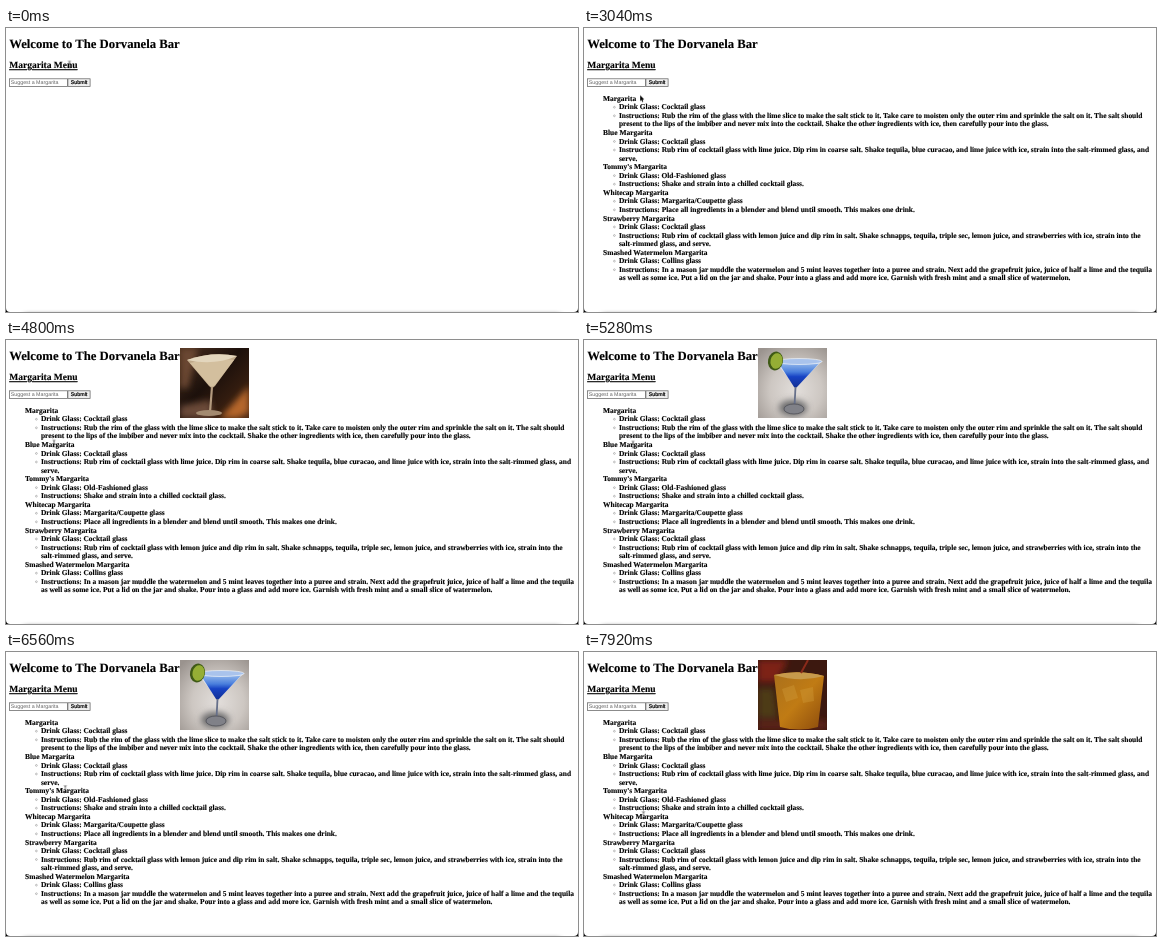
An HTML page that plays this animation: 572x284 px, repeating every 8 s.

```html
<!DOCTYPE html>
<html lang="en">
<head>
<meta charset="utf-8">
<title>Margarita Menu</title>
<style>
  html, body { margin: 0; width: 100%; height: 100%; overflow: hidden; background: #000; }
  svg { display: block; }
  text {
    font-family: "Liberation Serif", Times, serif; font-weight: bold;
    text-rendering: geometricPrecision; stroke: #000; stroke-width: .12;
  }
  .h1 { font-size: 12.71px; }
  .h2 { font-size: 9.53px; text-decoration: underline; }
  .list text { font-size: 7.455px; }
  .form text { font: 5.3px "Liberation Sans", Arial, sans-serif; stroke-width: .2; }
  .form .hint { fill: #666; stroke: none; }
  .list circle { fill: none; stroke: #555; stroke-width: .35; }
  .photo, .list, .arrow { opacity: 0; }
</style>
</head>
<body>
<svg width="572" height="284" viewBox="0 0 572 284">
  <defs>
    <clipPath id="page"><path d="M0 0H572V280Q572 284 568 284H4Q0 284 0 280Z"/></clipPath>
    <clipPath id="frame"><rect width="69" height="70"/></clipPath>
    <filter id="soft" x="-20%" y="-200%" width="140%" height="500%"><feGaussianBlur stdDeviation="3 1.5"/></filter>
    <filter id="haze" x="-50%" y="-50%" width="200%" height="200%"><feGaussianBlur stdDeviation="3"/></filter>
    <linearGradient id="bar" x2="1" y2="1">
      <stop stop-color="#4a3020"/><stop offset=".45" stop-color="#1c100b"/><stop offset="1" stop-color="#4d2a14"/>
    </linearGradient>
    <radialGradient id="wall" cx=".55" cy=".6" r=".75">
      <stop stop-color="#e2dedb"/><stop offset=".5" stop-color="#cdc7c2"/><stop offset="1" stop-color="#9a938e"/>
    </radialGradient>
    <linearGradient id="blue" x2="0" y2="1">
      <stop stop-color="#8fb4ea"/><stop offset=".35" stop-color="#4a7fdc"/><stop offset=".55" stop-color="#1743c4"/><stop offset="1" stop-color="#122f94"/>
    </linearGradient>
    <linearGradient id="amber" x2="1" y2="1">
      <stop stop-color="#a9701c"/><stop offset=".5" stop-color="#c07b14"/><stop offset="1" stop-color="#8c4b0c"/>
    </linearGradient>
  </defs>
  <g clip-path="url(#page)">
    <rect width="572" height="284" fill="#fff"/>
    <rect x="18" y="284" width="536" height="4" opacity=".25" filter="url(#soft)"/>
    <text class="h1" x="3.2" y="19.9">Welcome to The Dorvanela Bar</text>
    <text class="h2" x="3.2" y="40.2">Margarita Menu</text>
    <g class="form">
      <rect x="3.5" y="50.8" width="57.9" height="7.7" fill="#fff" stroke="#666" stroke-width=".75"/>
      <text class="hint" x="4.8" y="56.4">Suggest a Margarita</text>
      <rect x="61.9" y="50.8" width="22.2" height="7.7" fill="#efefef" stroke="#666" stroke-width=".75"/>
      <text x="64.8" y="56.4">Submit</text>
    </g>
    <g class="list"></g>

    <g transform="translate(174 8)" clip-path="url(#frame)">
      <g class="photo">
        <rect width="69" height="70" fill="url(#bar)"/>
        <g filter="url(#haze)">
          <path d="M40 70L69 38V64L58 70Z" fill="#b5662a"/>
          <path d="M0 0H18L8 40H0Z" fill="#6b4730"/>
          <path d="M0 58L30 52L34 70H0Z" fill="#6a4a38"/>
        </g>
        <path d="M7 12Q32 3 57 8L35 38Q32 41 29 38Z" fill="#bfa98a"/>
        <path d="M10 15Q32 9 54 12L35 37Q32 40 29 37Z" fill="#d3bf9e"/>
        <path d="M7 12Q32 3 57 8Q34 18 7 12Z" fill="#e3d6bd"/>
        <path d="M32 39L30 64" stroke="#b39a7e" stroke-width="2.2"/>
        <ellipse cx="29" cy="65" rx="13" ry="3" fill="#a38a70"/>
      </g>
      <g class="photo">
        <rect width="69" height="70" fill="url(#wall)"/>
        <ellipse cx="35" cy="60" rx="14" ry="8" fill="#6b6a6c" filter="url(#haze)"/>
        <path d="M17 13H64L38 40Z" fill="#dfe3ea"/>
        <path d="M21 15.5H61L39 39Q37.5 40 36 39Z" fill="url(#blue)"/>
        <ellipse cx="41" cy="13.5" rx="23" ry="3" fill="#a9c3ec" stroke="#eef2f6" stroke-width=".7"/>
        <path d="M37.5 39L36.5 58" stroke="#66708a" stroke-width="1.8"/>
        <ellipse cx="36" cy="61" rx="10" ry="5" fill="#808188" stroke="#505158" stroke-width=".8"/>
        <ellipse cx="17.5" cy="13" rx="7.5" ry="9.5" transform="rotate(12 17.5 13)" fill="#3f5a16"/>
        <ellipse cx="18.5" cy="13" rx="6" ry="7.8" transform="rotate(12 18.5 13)" fill="#95ae35"/>
      </g>
      <g class="photo">
        <rect width="69" height="70" fill="#3c180f"/>
        <g filter="url(#haze)">
          <path d="M0 0H30L18 22H0Z" fill="#7d2014"/>
          <path d="M0 28H16L20 58H0Z" fill="#4d3a18"/>
          <path d="M0 60H69V70H0Z" fill="#5a2112"/>
        </g>
        <path d="M16 15Q40 9 66 16L60 67Q41 72 22 67Z" fill="url(#amber)"/>
        <path d="M16 15Q40 9 66 16Q42 23 16 15Z" fill="#c79a4c"/>
        <path d="M24 29L36 25L40 38L28 42ZM42 30L55 27L56 41L45 43Z" fill="#d09a3a" opacity=".4"/>
        <path d="M43 13L50 0" stroke="#8a2a1a" stroke-width="2"/>
      </g>
    </g>

    <g class="cursor">
      <path class="beam" d="M-1.3 -3.3Q0 -3.3 0 -2.5Q0 -3.3 1.3 -3.3M0 -2.5V2.5M-1.3 3.3Q0 3.3 0 2.5Q0 3.3 1.3 3.3" fill="none" stroke="#111" stroke-width=".6"/>
      <path class="arrow" d="M-1.8 -3.2V2.6L-.5 1.4L.4 3.4L1.3 3L.5 1.1H2.3Z" stroke="#fff" stroke-width=".5" paint-order="stroke"/>
    </g>
  </g>
</svg>
<script>
const LOOP = 8000;
const $ = s => document.querySelector(s);

const drinks = [
  ["Margarita", "Cocktail glass",
    "Rub the rim of the glass with the lime slice to make the salt stick to it. Take care to moisten only the outer rim and sprinkle the salt on it. The salt should",
    "present to the lips of the imbiber and never mix into the cocktail. Shake the other ingredients with ice, then carefully pour into the glass."],
  ["Blue Margarita", "Cocktail glass",
    "Rub rim of cocktail glass with lime juice. Dip rim in coarse salt. Shake tequila, blue curacao, and lime juice with ice, strain into the salt-rimmed glass, and",
    "serve."],
  ["Tommy's Margarita", "Old-Fashioned glass", "Shake and strain into a chilled cocktail glass."],
  ["Whitecap Margarita", "Margarita/Coupette glass", "Place all ingredients in a blender and blend until smooth. This makes one drink."],
  ["Strawberry Margarita", "Cocktail glass",
    "Rub rim of cocktail glass with lemon juice and dip rim in salt. Shake schnapps, tequila, triple sec, lemon juice, and strawberries with ice, strain into the",
    "salt-rimmed glass, and serve."],
  ["Smashed Watermelon Margarita", "Collins glass",
    "In a mason jar muddle the watermelon and 5 mint leaves together into a puree and strain. Next add the grapefruit juice, juice of half a lime and the tequila",
    "as well as some ice. Put a lid on the jar and shake. Pour into a glass and add more ice. Garnish with fresh mint and a small slice of watermelon."]
];

const list = $(".list");
let y = 72.8;

function add(tag, attrs, text = "") {
  const el = document.createElementNS(list.namespaceURI, tag);
  for (const k in attrs) el.setAttribute(k, attrs[k]);
  el.textContent = text;
  list.append(el);
}
function line(text, x, bullet) {
  if (bullet) add("circle", { cx: 30.4, cy: y - 2.1, r: .9 });
  add("text", { x, y }, text);
  y += 8.55;
}
for (const [name, glass, how, more] of drinks) {
  line(name, 19.07);
  line("Drink Glass: " + glass, 34.95, true);
  line("Instructions: " + how, 34.95, true);
  if (more) line(more, 34.95);
}

const play = (el, frames) => {
  el.animate(frames, { duration: LOOP, iterations: Infinity }).startTime = 0;
};

// Shows an element between two times with hard cuts.
function show(el, from, to = LOOP, inside = 1) {
  const key = (t, opacity) => ({ offset: t / LOOP, opacity, easing: "step-end" });
  play(el, [key(0, 1 - inside), key(from, inside), key(to, to < LOOP ? 1 - inside : inside), key(LOOP, 1 - inside)]);
}

show(list, 880);
const photos = document.querySelectorAll(".photo");
show(photos[0], 3600, 5120);
show(photos[1], 5120, 7000);
show(photos[2], 7000);
show($(".arrow"), 1920, 3200);
show($(".beam"), 1920, 3200, 0);

// time, x, y
const path = [
  [0, 63.5, 36.5], [1760, 63.5, 36.5], [2400, 80, 67], [2640, 82, 71],
  [3040, 58, 70.5], [3440, 47.5, 71], [4080, 47.5, 71], [4800, 48, 103.5],
  [5280, 49, 104.5], [5920, 54, 114], [6560, 59.3, 137], [7200, 59.3, 138],
  [7920, 59.5, 163], [LOOP, 59.5, 163]
];
play($(".cursor"), path.map(([t, x, y]) => ({
  offset: t / LOOP, transform: `translate(${x}px, ${y}px)`, easing: "ease-in-out"
})));
</script>
</body>
</html>
```
